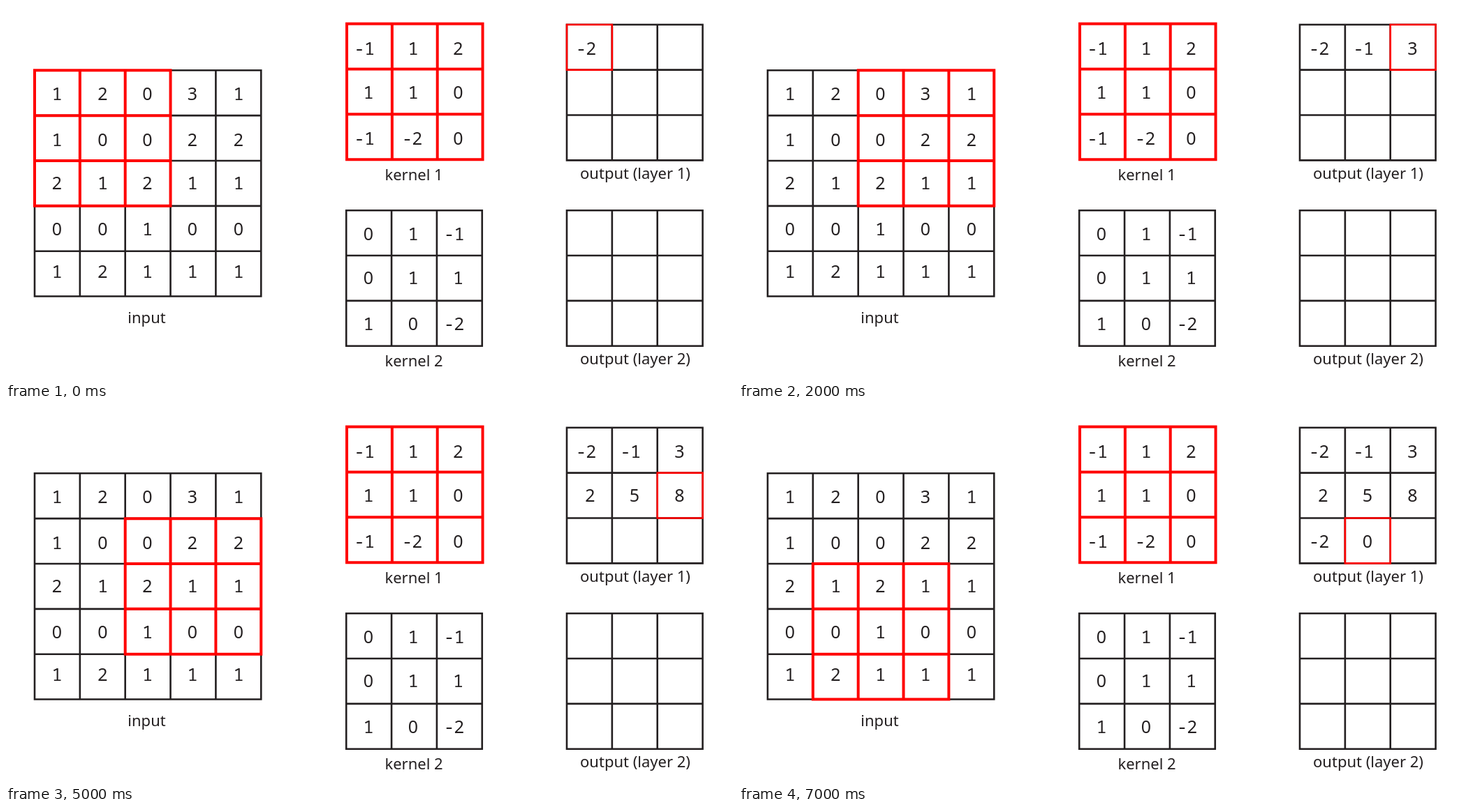
Animation of 1041x538 px, one loop 8000 ms. Source, as an HTML page with a canvas:

```html
<!DOCTYPE html>
<html lang="en">
<head>
<meta charset="utf-8">
<title>Convolution</title>
<style>
  html, body { margin: 0; width: 100%; height: 100%; overflow: hidden; background: #fff; }
  canvas { display: block; }
</style>
</head>
<body>
<canvas id="stage" width="1041" height="538"></canvas>
<script>
const ctx = document.getElementById('stage').getContext('2d');
const INK = '#231f20', RED = '#ff0000';
const CELL = 64.85, STEP_MS = 1000, STEPS = 8;
const SANS = '"Noto Sans", "Open Sans", sans-serif';
const MONO = '"Noto Sans Mono", "DejaVu Sans Mono", monospace';

const input = [
  [1, 2, 0, 3, 1],
  [1, 0, 0, 2, 2],
  [2, 1, 2, 1, 1],
  [0, 0, 1, 0, 0],
  [1, 2, 1, 1, 1]
];
const kernel1 = [[-1, 1, 2], [1, 1, 0], [-1, -2, 0]];
const kernel2 = [[0, 1, -1], [0, 1, 1], [1, 0, -2]];

// Text centres of each column and row
const inputX = [73, 138.5, 202.5, 267, 333], inputY = [126, 192, 254, 320, 381];
const kernelX = [519, 583, 647.5], outputX = [836.5, 900, 964.5];
const topY = [61, 124, 190], lowY = [327, 390, 456];

function convolve(row, col) {
  let sum = 0;
  for (let r = 0; r < 3; r++)
    for (let c = 0; c < 3; c++) sum += input[row + r][col + c] * kernel1[r][c];
  return sum;
}

function grid(x, y, n, color, width) {
  const size = n * CELL;
  ctx.strokeStyle = color;
  ctx.lineWidth = width;
  ctx.beginPath();
  ctx.rect(x, y, size, size);
  for (let i = 1; i < n; i++) {
    const d = i * CELL;
    ctx.moveTo(x + d, y);
    ctx.lineTo(x + d, y + size);
    ctx.moveTo(x, y + d);
    ctx.lineTo(x + size, y + d);
  }
  ctx.stroke();
}

function text(str, x, y, size, family) {
  ctx.font = size + 'px ' + family;
  ctx.fillText(str, x, y);
}

// Plain zero from the sans face, footed 1 from the mono face
function number(value, x, y) {
  const digit = String(Math.abs(value));
  if (value < 0) {
    x += 1.5;
    text('-', x - 14.5, y + 9, 25, MONO);
  }
  text(digit, x, y + 9, 25, digit === '1' ? MONO : SANS);
}

function numbers(rows, xs, ys) {
  rows.forEach((row, r) => row.forEach((v, c) => {
    const shift = rows === kernel1 && v === -2 ? 4.5 : 0;
    number(v, xs[c] + shift, ys[r]);
  }));
}

function label(str, x, y) {
  text(str, x, y, 22, SANS);
}

function draw(step) {
  const row = Math.floor(step / 3), col = step % 3;
  ctx.fillStyle = '#fff';
  ctx.fillRect(0, 0, 1041, 538);

  grid(41, 92.3, 5, INK, 2.6);
  grid(487.2, 293.2, 3, INK, 2.6);
  grid(803, 26.8, 3, INK, 2.6);
  grid(803, 293.2, 3, INK, 2.6);
  grid(488, 25.6, 3, RED, 4);
  grid(41 + col * CELL, 92.3 + row * CELL, 3, RED, 4);
  grid(803 + col * CELL, 26.8 + row * CELL, 1, RED, 2.6);

  ctx.fillStyle = INK;
  ctx.textAlign = 'center';
  numbers(input, inputX, inputY);
  numbers(kernel1, kernelX, topY);
  numbers(kernel2, kernelX, lowY);
  for (let i = 0; i <= step; i++) {
    const r = Math.floor(i / 3), c = i % 3;
    number(convolve(r, c), outputX[c], topY[r]);
  }

  label('input', 201.5, 455);
  label('kernel 1', 584, 250);
  label('kernel 2', 584, 517);
  label('output (layer 1)', 901, 247.5);
  label('output (layer 2)', 901, 514);
}

function frame() {
  draw(Math.floor(performance.now() / STEP_MS) % STEPS);
  requestAnimationFrame(frame);
}
frame();
</script>
</body>
</html>
```
